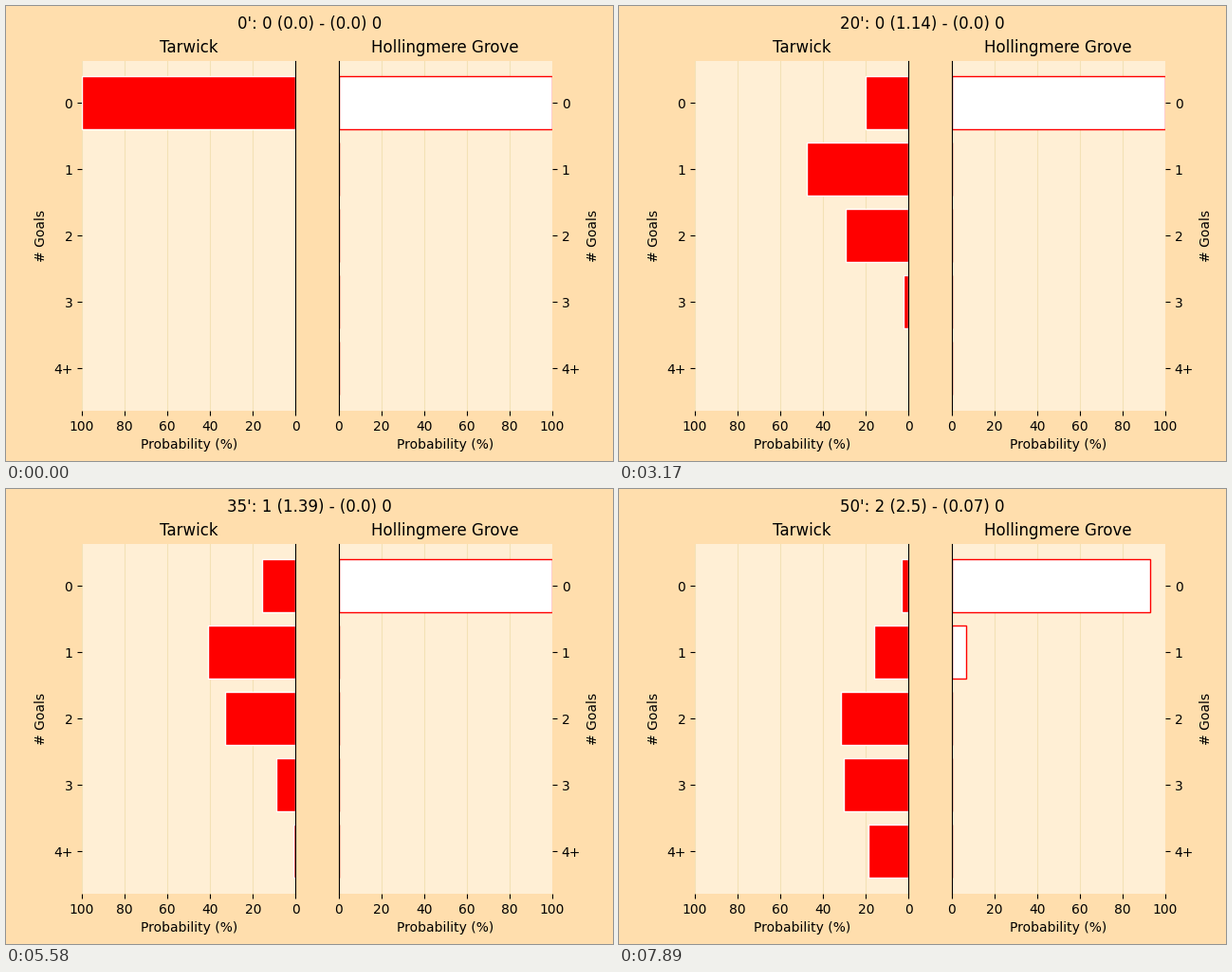
A matplotlib script that plays this animation: 640x480 px, repeating every 8 s.

```python
import numpy as np
import matplotlib.pyplot as plt
from matplotlib.animation import FuncAnimation

INTERVAL, LOOP = 20, 8000
HOLD, SUB, STEPS = 160, 30, 5      # quiet minute; steps of a minute with a shot
LABELS = ["0", "1", "2", "3", "4+"]

# minute -> chance of scoring
HOME = {4: .567, 10: .49, 13: .031, 18: .053, 22: .05, 26: .07,
        28: .068, 32: .025, 35: .067, 46: .54, 47: .54}
AWAY = {47: .07}
HOME_GOALS = (32, 46)


def clock(t):
    """Minute and share of its shots already counted at time t."""
    start, minute = 0, 0
    while True:
        shot = minute in HOME or minute in AWAY
        length = SUB * STEPS if shot else HOLD
        if t < start + length:
            return minute, ((t - start) // SUB + 1) / STEPS if shot else 1
        start += length
        minute += 1


def chances(shots, minute, share):
    return [p * (share if m == minute else 1)
            for m, p in shots.items() if m <= minute]


def goal_odds(probs):
    """Distribution of the goal count, with the last class open-ended."""
    odds = np.array([1.0, 0, 0, 0, 0])
    for p in probs:
        moved = odds * p
        odds = odds - moved
        odds[1:] += moved[:-1]
        odds[-1] += moved[-1]
    return odds * 100


def setup(ax, name, face, edge, inner):
    ax.set_facecolor("papayawhip")
    ax.set_axisbelow(True)
    ax.grid(axis="x", color="#f3e1b5")
    bars = ax.barh(range(5), [0] * 5, color=face, edgecolor=edge)
    ax.set_yticks(range(5), LABELS)
    ax.set_ylim(4.64, -0.64)
    ax.set_xticks(range(0, 101, 20))
    ax.set_title(name)
    ax.set_xlabel("Probability (%)")
    ax.set_ylabel("# Goals")
    for side, spine in ax.spines.items():
        spine.set_visible(side == inner)
    return bars


fig, (left, right) = plt.subplots(1, 2, figsize=(6.4, 4.8), dpi=100,
                                  facecolor="navajowhite")
home_bars = setup(left, "Tarwick", "red", "white", "right")
away_bars = setup(right, "Hollingmere Grove", "white", "red", "left")
left.set_xlim(100, 0)
right.set_xlim(0, 100)
right.yaxis.tick_right()
right.yaxis.set_label_position("right")
title = fig.suptitle("")


def update(i):
    minute, share = clock(i * INTERVAL + INTERVAL // 2)
    home = chances(HOME, minute, share)
    away = chances(AWAY, minute, share)
    for bars, probs in ((home_bars, home), (away_bars, away)):
        for bar, width in zip(bars, goal_odds(probs)):
            bar.set_width(width)
    goals = sum(m <= minute for m in HOME_GOALS)
    xg, xga = (round(float(sum(p)), 2) for p in (home, away))
    title.set_text(f"{minute}': {goals} ({xg}) - ({xga}) 0")
    return [*home_bars, *away_bars, title]


anim = FuncAnimation(fig, update, frames=LOOP // INTERVAL, interval=INTERVAL,
                     init_func=lambda: update(0), repeat=True, repeat_delay=0)
plt.show()
```
